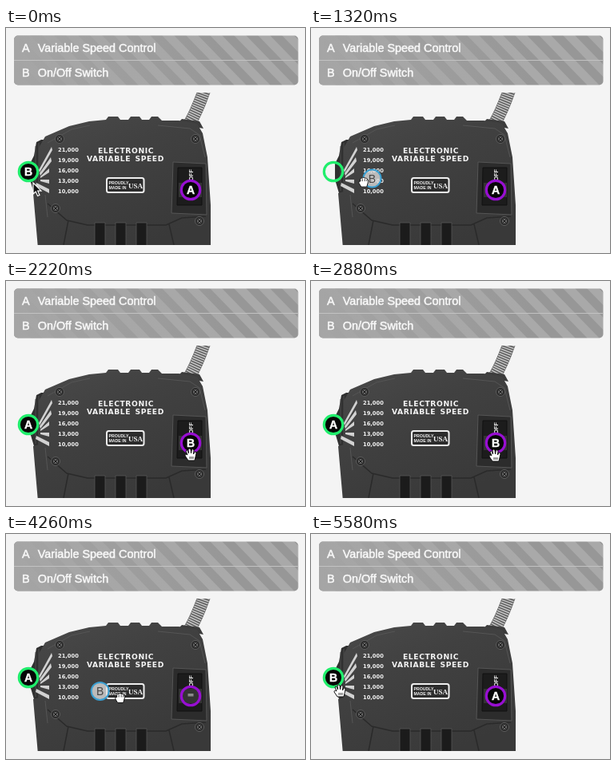
Animation of 374x282 px, one loop 5.64 s. Source, as an HTML page:

```html
<!DOCTYPE html>
<html lang="en">
<head>
<meta charset="utf-8">
<title>Label drag and drop</title>
<style>
  html, body { margin: 0; width: 100%; height: 100%; overflow: hidden; background: #f4f4f4; }
  svg { display: block; width: 100vw; height: 100vh; }
  text { font-family: "Liberation Sans", Arial, sans-serif; }
  .legend { font-size: 14.4px; fill: #f8f8f8; stroke: #f8f8f8; stroke-width: .5; }
  .print { font-weight: bold; fill: #f4f4f4; }
  .wide text { font-family: "DejaVu Sans", sans-serif; }
  .letter { font-size: 14px; font-weight: bold; text-anchor: middle; }
</style>
</head>
<body>
<svg viewBox="0 0 374 282">
  <defs>
    <pattern id="stripes" width="30" height="31" y="9" patternUnits="userSpaceOnUse">
      <rect width="30" height="31" fill="#a9a9a9"/>
      <path d="M0 0H15L45 31H30ZM-30 0H-15L15 31H0Z" fill="#979797"/>
    </pattern>
    <linearGradient id="fade">
      <stop stop-color="#a5a5a5"/><stop offset=".75" stop-color="#a5a5a5" stop-opacity="0"/>
    </linearGradient>
    <clipPath id="panel"><rect x="10" y="9.500" width="355.500" height="62" rx="5"/></clipPath>
    <clipPath id="photo"><rect y="81" width="374" height="191"/></clipPath>
    <linearGradient id="shell" x2=".6" y2="1">
      <stop stop-color="#4a4a4a"/><stop offset=".4" stop-color="#414141"/><stop offset="1" stop-color="#393939"/>
    </linearGradient>
    <g id="screw">
      <circle r="5.500" fill="#2a2a2a" stroke="#5c5c5c"/>
      <circle r="3" fill="#666"/>
      <path d="M-2 -2L2 2M-2 2L2 -2" stroke="#1a1a1a"/>
    </g>
  </defs>

  <g clip-path="url(#panel)">
    <rect x="10" y="9" width="356" height="63" fill="url(#stripes)"/>
    <rect x="10" y="9" width="356" height="63" fill="url(#fade)"/>
    <path d="M10 40.500H366" stroke="#c2c2c2"/>
  </g>
  <g class="legend">
    <text x="20" y="30">A</text><text x="39.700" y="30">Variable Speed Control</text>
    <text x="20" y="61">B</text><text x="39.700" y="61">On/Off Switch</text>
  </g>

  <g clip-path="url(#photo)">
    <g fill="none">
      <path d="M229 121Q239 104 248 78" stroke="#585858" stroke-width="16"/>
      <path d="M229 121Q239 104 248 78" stroke="#c4c4c4" stroke-width="15" stroke-dasharray="1.600 1.400"/>
    </g>
    <path d="M214 120L220 114L242 117L247 126Z" fill="#3c3c3c"/>
    <path d="M44 140L38 143L35 160L30 170V190L35 207H48V140Z" fill="#303030"/>
    <path d="M37 148V204M41 144V206" stroke="#4d4d4d" fill="none"/>
    <path d="M40 276L34 207L41 205V150L49 136L79 123L104 117L125 115L128 111H140L143 115H153L156 111H167L170 115H179L182 111H190L195 116H216L239 120L246 132L252 162L256 222V276Z" fill="url(#shell)"/>
    <path d="M52 237L49 209M52 144L82 127L105 122M190 122L230 126L242 134L249 162" fill="none" stroke="#555"/>
    <path d="M52 220L76 241L102 247H200L220 238L250 236M78 241L72 272M204 246L210 272" fill="none" stroke="#2a2a2a" stroke-width="1.500"/>
    <g id="vents"></g>
    <use href="#screw" x="67" y="139"/><use href="#screw" x="237" y="139"/>
    <use href="#screw" x="62" y="226"/><use href="#screw" x="242" y="242"/>
    <path d="M41 178L57 149L58 153L42 181ZM42 182L56 162L57 167L43 185ZM43 186L54 176V181L43 188ZM43 190L54 190V195L43 192ZM38 194L54 202V207L37 198Z" fill="#d2d2d2"/>
    <g id="speeds" class="print wide" font-size="6.700"></g>
    <g class="print wide" font-size="9.200" letter-spacing=".6" word-spacing="1.500" text-anchor="middle">
      <text x="150" y="157">ELECTRONIC</text><text x="149.500" y="167">VARIABLE SPEED</text>
    </g>
    <rect x="126" y="188" width="46.500" height="18" rx="2.500" fill="#2c2c2c" stroke="#eee" stroke-width="2"/>
    <g class="print" font-size="5.200">
      <text x="128.500" y="196">PROUDLY</text><text x="128.500" y="201.500">MADE IN</text>
    </g>
    <text class="print" x="153" y="200.500" font-size="9" style="font-family:'Liberation Serif',serif">USA</text>
    <path d="M209 168L250 170L251 234L207 232Z" fill="#2c2c2c" stroke="#555"/>
    <path d="M215 175H245V222H214Z" fill="#1c1c1c" stroke="#111"/>
    <path d="M216 194H245V212H216Z" fill="#343434"/>
    <rect x="227.500" y="200" width="7" height="3.500" fill="#8a8a8a"/>
    <text class="print" font-size="7.200" transform="translate(234 191.500) rotate(-90)">OFF</text>
  </g>

  <g id="slots"></g>
  <g id="chip">
    <circle r="11" fill="#dedede" fill-opacity=".78" stroke="#399fd2" stroke-width="2"/>
    <text class="letter" y="5" fill="#444" style="font-weight:normal">B</text>
  </g>
  <g id="cursor">
    <path id="arrow" d="M-5 -8V6L-1.800 3L.6 8.500L3 7.400L.7 2.200H5Z" fill="#111" stroke="#fff" stroke-width="1.200"/>
    <g id="open" fill="#fff" stroke="#111" stroke-linejoin="round">
      <path d="M-3 7L-7 1Q-7 -2 -4 0L-6 -5Q-5 -7 -3.500 -5L-2.500 -2L-3 -7Q-1 -9 0 -7L.5 -2L1.500 -7Q3 -8 4 -6L3.500 -1L5 -4Q7 -5 7 -2L5 7Z"/>
      <path d="M-1 2V5M1 2V5M3 2V5" stroke-width=".8"/>
    </g>
    <g id="fist" fill="#fff" stroke="#111" stroke-linejoin="round">
      <path d="M-3 7L-6 2Q-6 -1 -4 0V-3Q-3 -5 -1.500 -4Q0 -6 1.500 -4Q3 -5 4 -3Q6 -3 6 0L4 7Z"/>
      <path d="M-1.500 -3V0M1.500 -3V0M4 -2V0" stroke-width=".8"/>
    </g>
  </g>
</svg>
<script>
const LOOP = 5640, STEP = 60;
const DRAGS = [[1020, 2220], [3780, 5220]];
const GRIP = [5, 6];
const $ = id => document.getElementById(id);

// Rows are [time, x, y]; the hand rests between equal points.
const handPath = [
  [0, 39, 202], [120, 39, 202], [540, 33, 187], [1020, 33, 187], [1950, 231, 218],
  [2280, 231, 218], [2580, 230, 219], [3180, 230, 219], [3540, 236, 212], [3770, 236, 212],
  [4670, 36, 196], [LOOP, 36, 197]
];

$('vents').innerHTML = [111, 137, 163].map(x =>
  `<path d="M${x} 273V244H${x + 13}V273Z" fill="#1b1b1b" stroke="#565656" stroke-width=".8"/>`
).join('');
$('speeds').innerHTML = [21, 19, 16, 13, 10].map((n, i) =>
  `<text x="65" y="${154.5 + i * 13}">${n},000</text>`).join('');

function show(node, visible) {
  node.style.display = visible ? '' : 'none';
}

function makeSlot(x, y, color) {
  const slot = document.createElementNS('http://www.w3.org/2000/svg', 'g');
  slot.setAttribute('transform', `translate(${x} ${y})`);
  slot.innerHTML = `<g><circle r="11"/><text class="letter" y="5" fill="#fff" stroke="#fff" stroke-width=".4"></text></g>
    <circle r="11.700" fill="none" stroke="${color}" stroke-width="3.200"/>`;
  $('slots').append(slot);
  const badge = slot.firstChild;
  return (letter, covered = false) => {
    show(badge, letter);
    badge.lastChild.textContent = letter;
    badge.firstChild.setAttribute('fill', covered ? '#b0b0b0' : '#060606');
  };
}
const setLeft = makeSlot(28, 180, '#20ee6c');
const setRight = makeSlot(231, 203, '#980fd2');

function handAt(t) {
  const i = Math.max(1, handPath.findIndex(row => t <= row[0]));
  const [t0, x0, y0] = handPath[i - 1], [t1, x1, y1] = handPath[i];
  const p = Math.max(0, (t - t0) / (t1 - t0));
  const ease = p * p * (3 - 2 * p);
  return [x0 + (x1 - x0) * ease, y0 + (y1 - y0) * ease];
}

function place(node, x, y) {
  node.setAttribute('transform', `translate(${x} ${y})`);
}

function render(time) {
  const t = Math.floor(time % LOOP / STEP) * STEP;
  const drag = DRAGS.findIndex(([start, end]) => t >= start && t < end);
  const swapped = t >= DRAGS[0][1] && t < DRAGS[1][1];
  const [x, y] = handAt(t);

  if (drag === 0) { setLeft(''); setRight('A', x > 215); }
  else if (drag === 1) { setLeft('A', x < 50); setRight(''); }
  else { setLeft(swapped ? 'A' : 'B'); setRight(swapped ? 'B' : 'A'); }

  show($('chip'), drag >= 0);
  place($('chip'), x - GRIP[0], y - GRIP[1]);
  // The drawn pointer trails the dragged label by one step.
  place($('cursor'), ...handAt(t - STEP));
  show($('arrow'), t < 360);
  show($('open'), t >= 360 && drag < 0);
  show($('fist'), drag >= 0);
}

const begin = performance.now();
function tick() {
  render(performance.now() - begin);
  requestAnimationFrame(tick);
}
tick();
</script>
</body>
</html>
```
